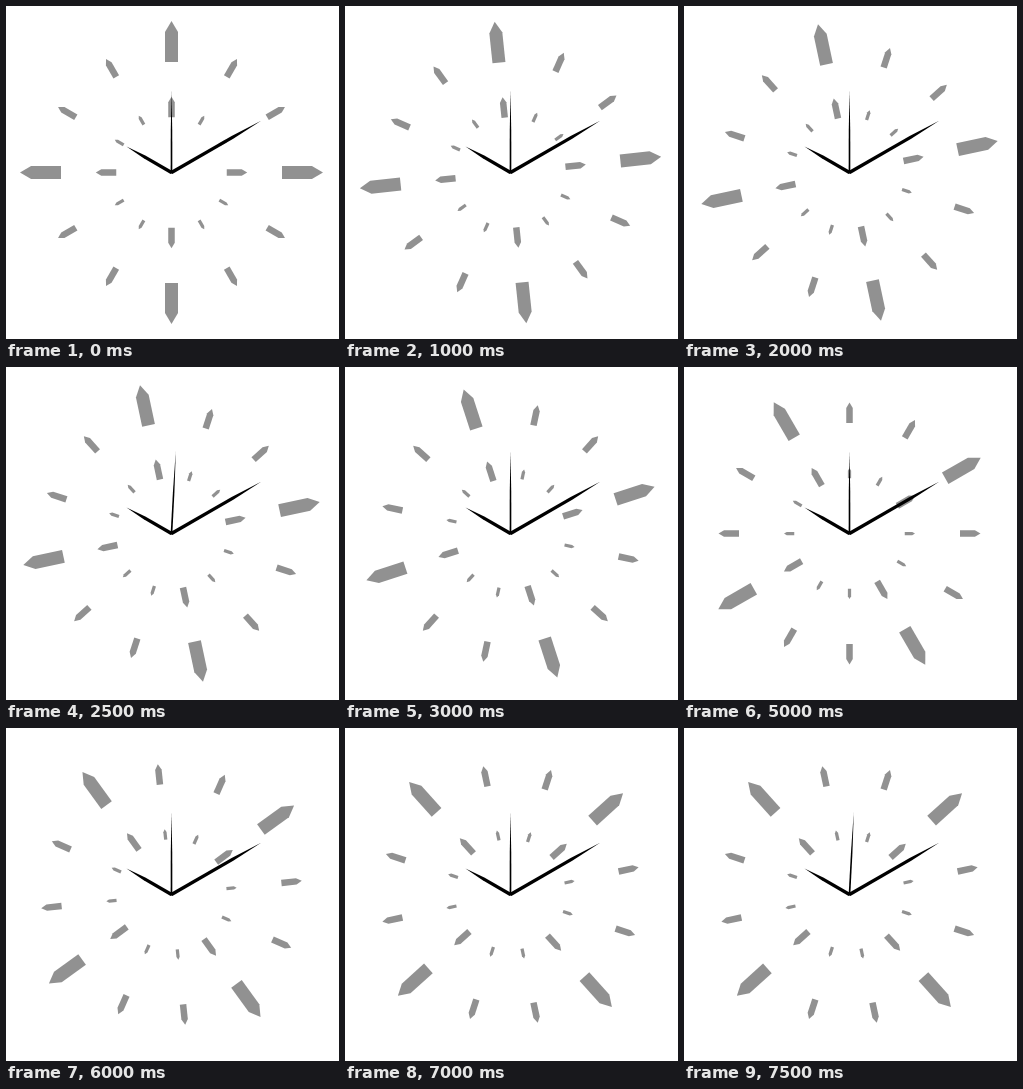
Recreate the animation shown at these times as an HTML page with a canvas. Size 333 by 333 pixels, loop 8000 ms.

```html
<!DOCTYPE html>
<html lang="en">
<head>
<meta charset="utf-8">
<title>Clock</title>
<style>
  html, body { margin: 0; width: 100%; height: 100%; overflow: hidden; background: #fff; }
  canvas { display: block; width: 333px; height: 333px; }
</style>
</head>
<body>
<canvas id="stage"></canvas>
<script>
const SIZE = 333, CX = 165.5, CY = 166.5, LOOP = 8000;
const GREY = '#919191', BLACK = '#000';
const canvas = document.getElementById('stage');
const ctx = canvas.getContext('2d');
const dpr = window.devicePixelRatio || 1;
canvas.width = canvas.height = SIZE * dpr;

function polygon(points, color) {
  ctx.beginPath();
  for (const [x, y] of points) ctx.lineTo(x, y);
  ctx.closePath();
  ctx.fillStyle = color;
  ctx.fill();
}

function rotated(deg, draw) {
  ctx.save();
  ctx.rotate(deg * Math.PI / 180);
  draw();
  ctx.restore();
}

// Pointed bar standing on radius `base`, aimed outwards
function marker(base, height, width) {
  const half = width / 2, shoulder = base + height * 0.73;
  polygon([[-half, -base], [-half, -shoulder], [0, -base - height],
           [half, -shoulder], [half, -base]], GREY);
}

// Twelve markers; every third one is twice as large
function ring(scale, turn) {
  for (let i = 0; i < 12; i++) {
    const s = i % 3 ? scale / 2 : scale;
    rotated(turn + i * 30, () => marker(110.5 * scale, 41 * s, 13 * s));
  }
}

function hand(deg, length, width, taper) {
  const half = width / 2, neck = length * taper;
  rotated(deg, () => polygon([[-half, 0], [-half * 0.9, -neck], [0, -length],
                              [half * 0.9, -neck], [half, 0]], BLACK));
}

function draw(ms) {
  const dial = -6 * Math.floor(ms / 1000);
  const tick = ms % 1000 < 500 ? 0 : 3;
  ctx.setTransform(dpr, 0, 0, dpr, 0, 0);
  ctx.fillStyle = '#fff';
  ctx.fillRect(0, 0, SIZE, SIZE);
  ctx.translate(CX, CY);
  ring(1, dial);
  ring(0.5, dial);
  hand(60, 103.5, 3.6, 0.68);
  hand(300, 52, 3.6, 0.6);
  hand(tick, 82.5, 1.7, 0.5);
  ctx.beginPath();
  ctx.arc(0, -0.5, 1.8, 0, Math.PI * 2);
  ctx.fillStyle = BLACK;
  ctx.fill();
}

const start = performance.now();
function frame(now) {
  draw(Math.max(0, now - start) % LOOP);
  requestAnimationFrame(frame);
}
draw(0);
requestAnimationFrame(frame);
</script>
</body>
</html>
```
